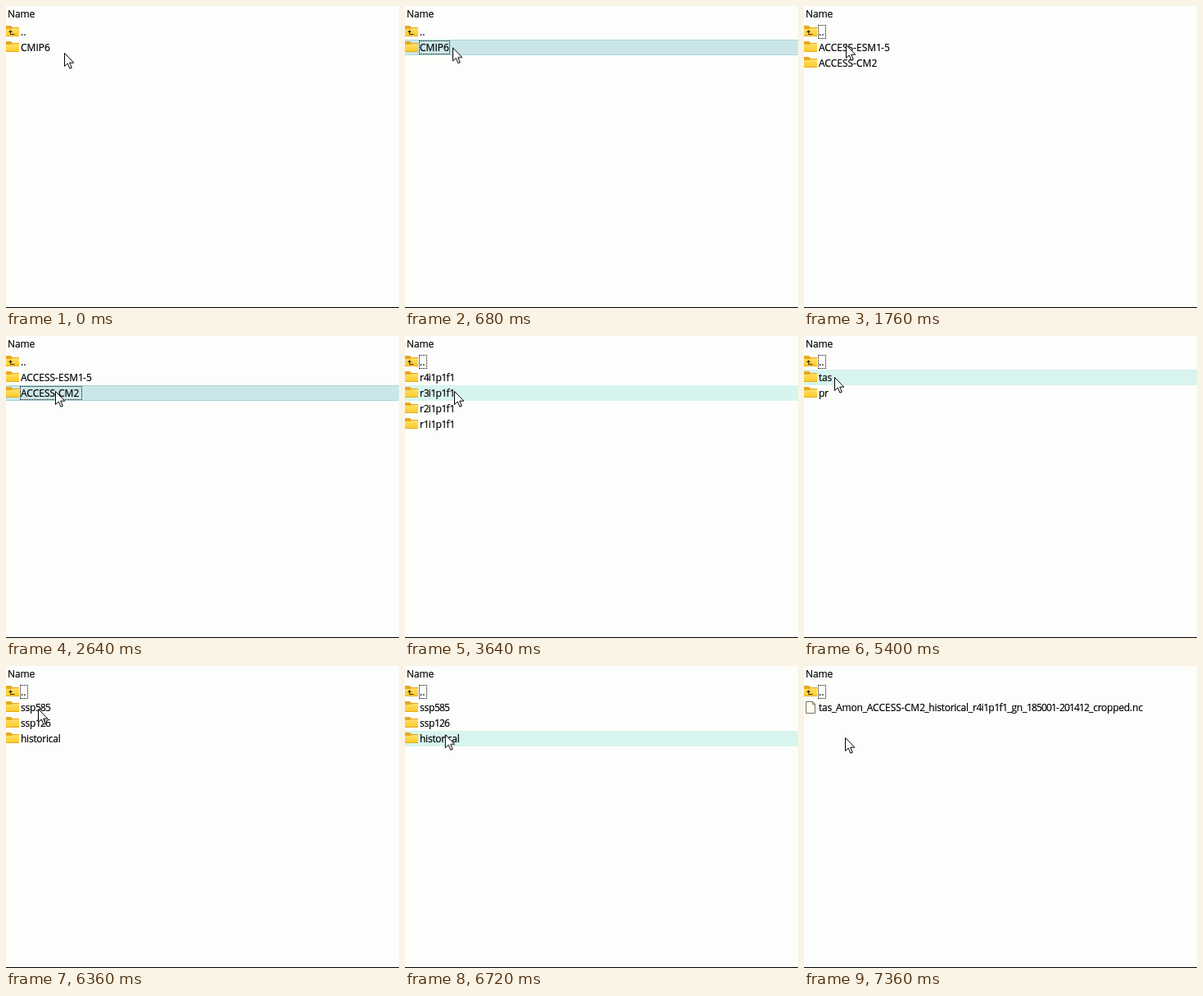
Recreate the animation shown at these times as an HTML page. Size 480 px wide and 368 px high, loop 8000 ms.

```html
<!DOCTYPE html>
<html lang="en">
<head>
<meta charset="utf-8">
<title>Browsing folders</title>
<style>
  html, body { margin: 0; width: 100%; height: 100%; overflow: hidden; }
  body {
    position: relative;
    background: #fdfefb;
    color: #000;
    font: 12px/19px "Open Sans", "Noto Sans", sans-serif;
    -webkit-text-stroke: .2px #000;
    white-space: pre;
  }
  body > * { position: absolute; }
  svg { overflow: visible; }

  .head { left: 2px; top: 0; }
  .rule { left: 0; right: 0; top: 367px; height: 1px; background: #000; }

  /* Rows are 19px high; the parent folder row starts at 22px. */
  .row { position: relative; height: 19px; padding-left: 18px; }
  .row svg { position: absolute; left: 0; top: 0; width: 16px; height: 19px; }
  .parent, .view { left: 0; width: 480px; }
  .parent { top: 22px; }
  .view { top: 41px; visibility: hidden; }
  .num { letter-spacing: -.85px; }
  .low { letter-spacing: -.25px; }

  .bar, .focus, .view { animation: 8s step-end infinite; }
  .bar {
    left: 0; top: 41px; width: 480px; height: 19px;
    box-sizing: border-box;
    border: solid transparent; border-width: 1px 0;
    animation-name: bar;
  }
  .focus {
    left: 17px; top: 23px; width: 10px; height: 17px;
    box-sizing: border-box;
    border: 1px dotted #000;
    animation-name: focus;
  }
  .cursor { left: 0; top: 0; width: 13px; height: 20px; animation: cursor 8s linear infinite; }

  #root { animation-name: root; }
  #models { animation-name: models; }
  #members { animation-name: members; }
  #vars { animation-name: vars; }
  #runs { animation-name: runs; }
  #files { animation-name: files; }

  @keyframes root { 0% { visibility: visible } 16%, 100% { visibility: hidden } }
  @keyframes models { 0% { visibility: hidden } 16% { visibility: visible } 38%, 100% { visibility: hidden } }
  @keyframes members { 0% { visibility: hidden } 38% { visibility: visible } 58%, 100% { visibility: hidden } }
  @keyframes vars { 0% { visibility: hidden } 58% { visibility: visible } 74%, 100% { visibility: hidden } }
  @keyframes runs { 0% { visibility: hidden } 74% { visibility: visible } 91%, 100% { visibility: hidden } }
  @keyframes files { 0% { visibility: hidden } 91%, 100% { visibility: visible } }

  /* Pale = hovered row, darker with edges = selected row. */
  @keyframes bar {
    0%, 16%, 38%, 58%, 74%, 91%, 100% { background: transparent; border-color: transparent; top: 41px }
    1%, 24%, 48%, 65%, 80% { background: #d8f4ee; border-color: #d8f4ee; top: 41px }
    26%, 45.5%, 81.5% { background: #d8f4ee; border-color: #d8f4ee; top: 60px }
    83% { background: #d8f4ee; border-color: #d8f4ee; top: 79px }
    5.5%, 55.5%, 70.5% { background: #cbe6e9; border-color: #a9d8d6; top: 41px }
    33% { background: #cbe6e9; border-color: #a9d8d6; top: 60px }
    88% { background: #cbe6e9; border-color: #a9d8d6; top: 79px }
  }
  @keyframes focus {
    0% { visibility: hidden }
    5.5% { visibility: visible; top: 42px; width: 38px }
    16%, 38%, 58%, 74%, 91%, 100% { visibility: visible; top: 23px; width: 10px }
    33% { visibility: visible; top: 61px; width: 76px }
    55.5% { visibility: visible; top: 42px; width: 45px }
    70.5% { visibility: visible; top: 42px; width: 18px }
    88% { visibility: visible; top: 80px; width: 51px }
  }
  @keyframes cursor {
    0%, 1% { transform: translate(71px, 57px) }
    2%, 5.5% { transform: translate(61px, 52px) }
    15.5%, 24% { transform: translate(51px, 47px) }
    27.5%, 45.5% { transform: translate(60px, 67px) }
    50%, 65% { transform: translate(47px, 54px) }
    67.5%, 70.5% { transform: translate(37px, 50px) }
    75%, 80% { transform: translate(39px, 52px) }
    84.5%, 100% { transform: translate(50px, 87px) }
  }
</style>
</head>
<body>
<svg width="0" height="0">
  <defs>
    <linearGradient id="gold" x2="0" y2="1">
      <stop offset="0" stop-color="#ffe066"/>
      <stop offset="1" stop-color="#fbc926"/>
    </linearGradient>
    <symbol id="folder" viewBox="0 0 16 19">
      <path d="M0 2h6l2 2h8v4H0z" fill="#e6a921"/>
      <path d="M0 6h6.500l2-1H16V15H0z" fill="url(#gold)"/>
      <path d="M0 14.500H16" stroke="#e3ab24"/>
    </symbol>
    <symbol id="up" viewBox="0 0 16 19">
      <use href="#folder"/>
      <path d="M5.500 8v4.500h5" fill="none" stroke="#3a2c08"/>
      <path d="M3 10L5.500 7.200 8 10z" fill="#3a2c08"/>
    </symbol>
    <symbol id="file" viewBox="0 0 16 19">
      <path d="M2.500 2.500h8l3 3v11h-11z" fill="#fffdec" stroke="#74746a"/>
      <path d="M10.500 2.500v3h3" fill="none" stroke="#74746a"/>
    </symbol>
  </defs>
</svg>

<div class="bar"></div>
<div class="head" data-text="Name"></div>
<div class="parent" data-icon="up" data-rows=".."></div>
<div class="view" id="root" data-rows="CMIP6"></div>
<div class="view" id="models" data-rows="ACCESS-ESM1-5 ACCESS-CM2"></div>
<div class="view" id="members" data-rows="r4i1p1f1 r3i1p1f1 r2i1p1f1 r1i1p1f1"></div>
<div class="view" id="vars" data-rows="tas pr"></div>
<div class="view" id="runs" data-rows="ssp585 ssp126 historical"></div>
<div class="view" id="files" data-icon="file" data-rows="tas_Amon_ACCESS-CM2_historical_r4i1p1f1_gn_185001-201412_cropped.nc"></div>
<div class="focus"></div>
<div class="rule"></div>
<svg class="cursor" viewBox="0 0 13 20">
  <path d="M.5.500V16.500L4.200 13 6.900 19.200 9.300 18.200 6.700 12.200H11.800z" fill="#fff" stroke="#000"/>
</svg>

<script>
  // Small letters and digits are set a little tighter than capitals.
  const label = text => text
    .replace(/[0-9]+|[a-z_]+/g, run =>
      `<span class="${/\d/.test(run) ? 'num' : 'low'}">${run}</span>`);

  for (const el of document.querySelectorAll('[data-text]'))
    el.innerHTML = label(el.dataset.text);

  for (const el of document.querySelectorAll('[data-rows]')) {
    const icon = el.dataset.icon || 'folder';
    el.innerHTML = el.dataset.rows.split(' ').map(name =>
      `<div class="row"><svg><use href="#${icon}"/></svg>${label(name)}</div>`).join('');
  }
</script>
</body>
</html>
```
